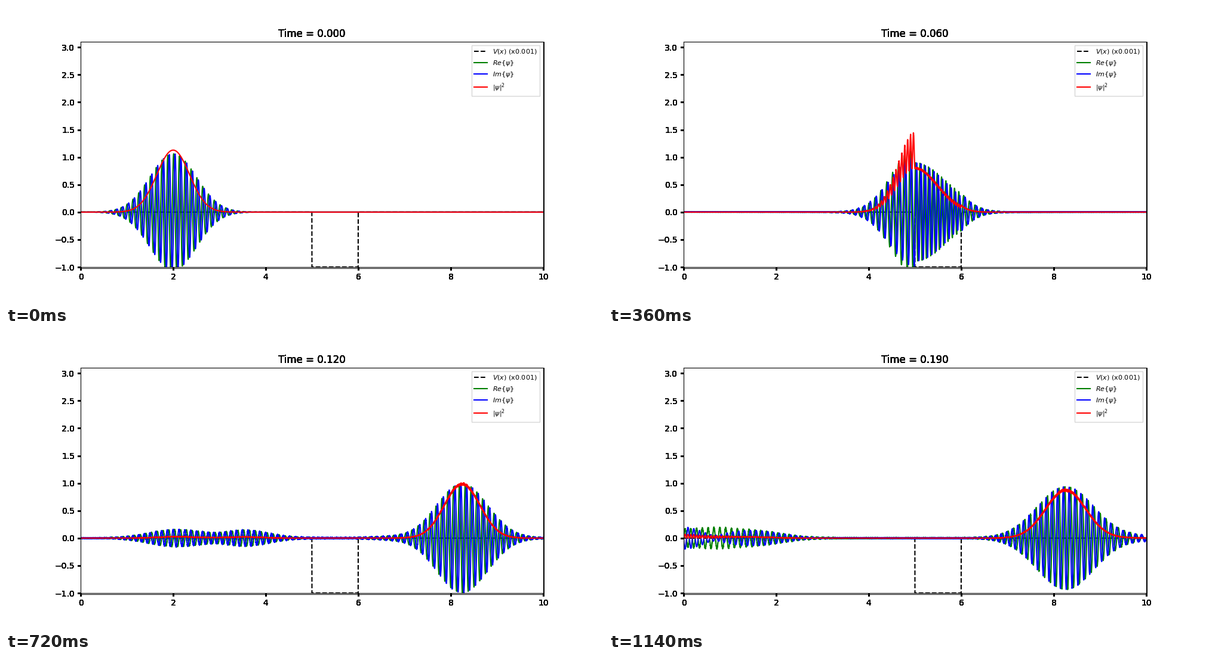
A matplotlib script for the animation above (1200 ms loop, 1000x500 px).

```python
import numpy as np
import matplotlib.pyplot as plt
from matplotlib.animation import FuncAnimation
from matplotlib.patches import Rectangle

FRAMES, INTERVAL = 20, 60
FRAME_DT = 0.01            # simulated time per frame
SUBSTEPS = 250
N = 5000                   # grid cells on 0..10
DX = 10 / N
K0, X0, SIGMA = 50, 2, 0.5

x = np.arange(N + 1) * DX
cell = np.arange(N + 1)
V = np.where((cell >= N // 2) & (cell < 6 * N // 10), -1000.0, 0.0)


def mirror(values, sign):
    """Extend 0..10 to a periodic odd (-1) or even (+1) array."""
    return np.concatenate([values, sign * values[-2:0:-1]])


def simulate():
    """Split-step evolution of a wave packet between hard walls."""
    psi = (np.exp(-(x - X0) ** 2 / (2 * SIGMA ** 2) + 1j * K0 * x)
           / np.sqrt(SIGMA * np.sqrt(np.pi)))
    psi[[0, -1]] = 0
    psi = mirror(psi, -1)
    dt = FRAME_DT / SUBSTEPS
    k = 2 * np.pi * np.fft.fftfreq(2 * N, DX)
    kinetic = np.exp(-1j * dt * (1 - np.cos(k * DX)) / DX ** 2)
    full = np.exp(-1j * dt * mirror(V, 1))
    half = np.exp(-0.5j * dt * mirror(V, 1))
    states = [psi[:N + 1].copy()]
    for _ in range(FRAMES - 1):
        psi = psi * half
        for _ in range(SUBSTEPS):
            psi = np.fft.ifft(kinetic * np.fft.fft(psi)) * full
        psi = psi / half
        states.append(psi[:N + 1].copy())
    return states


states = simulate()

fig = plt.figure(figsize=(10, 5), dpi=100, facecolor="white")
BOX = [0.125, 0.124, 0.775, 0.756]


def add_layer():
    ax = fig.add_axes(BOX)
    ax.set_xlim(0, 10)
    ax.set_ylim(-1, 3.1)
    ax.tick_params(width=2.16)
    return ax


ax = add_layer()
ax.plot(x, V * 0.001, "k--", label=r"$V(x)$ (x0.001)")
re_line, = ax.plot([], [], "g", label=r"$Re\{\psi\}$")
im_line, = ax.plot([], [], "b", label=r"$Im\{\psi\}$")
prob_line, = ax.plot([], [], "r", label=r"$\vert\psi\vert^2$")
ax.legend(loc="upper right", fontsize=8, fancybox=False)

# Outer edge of the frame, one pixel outside the spines
fig.add_artist(Rectangle((0.1245, 0.121), 0.777, 0.76, fill=False,
                         edgecolor="black", linewidth=0.72))

# Overprinted labels give the hard, heavy text edges
layers = [ax]
for _ in range(6):
    layer = add_layer()
    layer.patch.set_visible(False)
    layer.spines[:].set_visible(False)
    layers.append(layer)
titles = [layer.set_title("") for layer in layers]


def update(i):
    psi = states[i]
    re_line.set_data(x, psi.real)
    im_line.set_data(x, psi.imag)
    prob_line.set_data(x, np.abs(psi) ** 2)
    for title in titles:
        title.set_text(f"Time = {i * FRAME_DT:.3f}")
    return [re_line, im_line, prob_line, *titles]


anim = FuncAnimation(fig, update, frames=FRAMES, interval=INTERVAL,
                     repeat=True, repeat_delay=0, blit=False)
plt.show()
```
